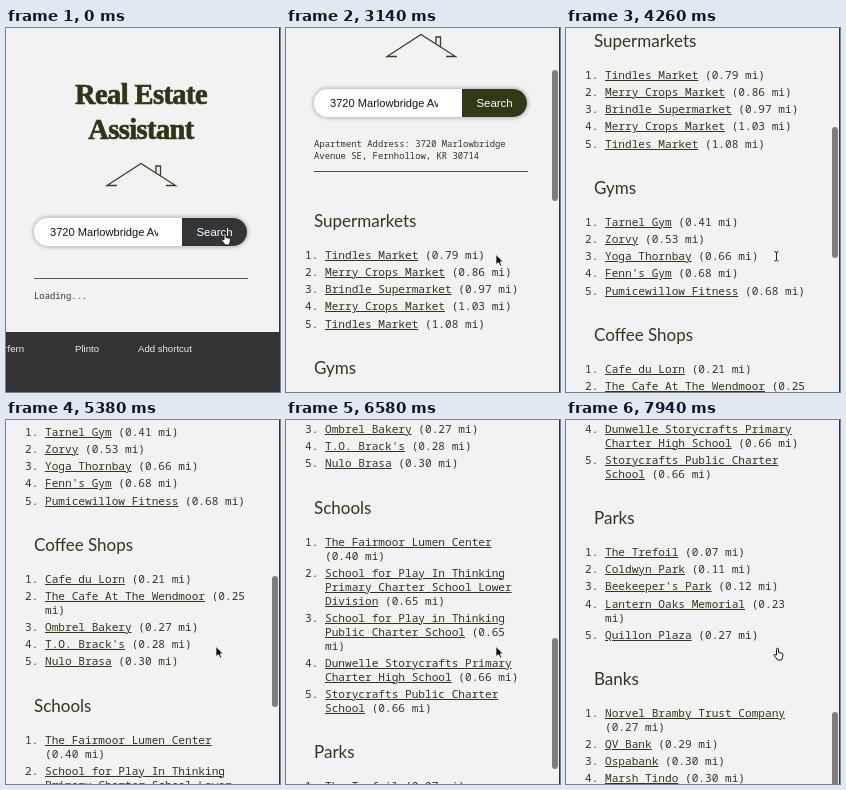
Recreate the animation shown at these times as an HTML page. Size 274 px wide and 364 px high, loop 8000 ms.

```html
<!DOCTYPE html>
<html lang="en">
<head>
<meta charset="utf-8">
<title>Real Estate Assistant</title>
<style>
html, body { margin: 0; width: 100%; height: 100%; overflow: hidden; background: #f2f2f2; }
#stage { position: relative; width: 274px; height: 364px; overflow: hidden; color: #2f381b; }
#stage div, #stage svg { position: absolute; white-space: nowrap; }
#page { left: 0; top: 0; width: 274px; }
#title { left: 0; top: 48.5px; width: 270px; text-align: center; color: #2c3616;
  font: bold 28.5px/35px "Liberation Serif", serif; letter-spacing: -.6px; -webkit-text-stroke: .7px #2c3616; }
#house { left: 0; top: 0; fill: none; stroke: #363f20; stroke-width: 1.3; }
#search { left: 28px; top: 190px; width: 213px; height: 28px; border-radius: 14px; overflow: hidden; background: #fff;
  font: 11.1px/28px "Liberation Sans", sans-serif; color: #111; }
#shade { left: 28px; top: 190px; width: 213px; height: 28px; border-radius: 14px; box-shadow: 0 0 4px 1px rgba(0,0,0,.28); }
#query { left: 16px; width: 108px; overflow: hidden; }
#button { left: 148px; width: 65px; height: 28px; text-align: center; color: #fff; font-size: 11.4px; }
.small { left: 28px; font: 8.89px/11.5px "Noto Sans Mono", monospace; }
.rule { left: 28px; width: 214px; height: 1px; background: #555; }
#list { left: 0; top: 284.45px; width: 274px; }
h2 { margin: 27.55px 0 16.75px 28px; font: 17px/20px Lato, sans-serif; }
ol { margin: 0; padding: 0 0 0 39px; width: 203px; list-style: none; counter-reset: n; white-space: normal;
  font: 11.11px/13.9px "Noto Sans Mono", monospace; }
li { position: relative; margin-bottom: 3.3px; counter-increment: n; }
li::before { content: counter(n) "."; position: absolute; left: -20px; }
#thumb { left: 266px; width: 6px; height: 131px; border-radius: 3px; background: #7d7d7d; }
#edge { left: 273px; top: 0; width: 1px; height: 364px; background: #333; }
#bar { left: 0; top: 304px; width: 274px; height: 60px; background: #333; color: #eee;
  font: 9.6px/34px "Liberation Sans", sans-serif; }
#stage svg.cursor { left: 0; top: 0; overflow: visible; stroke-linejoin: round; }
</style>
</head>
<body>
<div id="stage">
  <div id="page">
    <div id="title">Real Estate<br>Assistant</div>
    <svg id="house" width="274" height="170"><path d="M111 157.5H101L135 135.5L169.5 157.5H160M150 144.5V138H154.5V147.5"/></svg>
    <div id="shade"></div>
    <div id="search"><div id="query">3720 Marlowbridge Avenue SE</div><div id="button">Search</div></div>
    <div id="loading">
      <div class="rule" style="top:250px"></div>
      <div class="small" style="top:261.5px">Loading...</div>
    </div>
    <div id="results">
      <div class="small" style="top:239.3px">Apartment Address: 3720 Marlowbridge<br>Avenue SE, Fernhollow, KR 30714</div>
      <div class="rule" id="line" style="top:272px"></div>
      <div id="list"></div>
    </div>
  </div>
  <div id="thumb"></div>
  <div id="bar">
    <div style="right:256px">rfern</div>
    <div style="left:69px">Plinto</div>
    <div style="left:132px">Add shortcut</div>
  </div>
  <div id="edge"></div>
  <svg class="cursor" id="hand" width="12" height="14"><path fill="#fff" stroke="#111" d="M3 7V1.2a1 1 0 0 1 2 0V4.5l3.6.8q1 .3.9 1.5L9 9.5l-.9 2.5H4.2L.6 7.6q-.3-1.2.9-1Z"/></svg>
  <svg class="cursor" id="arrow" width="12" height="14"><path stroke="#fff" stroke-width=".8" d="M0 0V10.2L2.4 8l1.7 3.6 1.6-.8L4.1 7.4H7.2Z"/></svg>
  <svg class="cursor" id="beam" width="6" height="12"><path fill="none" stroke="#222" d="M.5.5Q2.5.5 2.5 2V8.5Q2.5 10 .5 10M4.5.5Q2.5.5 2.5 2M2.5 8.5Q2.5 10 4.5 10"/></svg>
</div>
<script>
const places = `Supermarkets|Tindles Market,0.79|Merry Crops Market,0.86|Brindle Supermarket,0.97|Merry Crops Market,1.03|Tindles Market,1.08
Gyms|Tarnel Gym,0.41|Zorvy,0.53|Yoga Thornbay,0.66|Fenn's Gym,0.68|Pumicewillow Fitness,0.68
Coffee Shops|Cafe du Lorn,0.21|The Cafe At The Wendmoor,0.25|Ombrel Bakery,0.27|T.O. Brack's,0.28|Nulo Brasa,0.30
Schools|The Fairmoor Lumen Center,0.40|School for Play In Thinking Primary Charter School Lower Division,0.65|School for Play in Thinking Public Charter School,0.65|Dunwelle Storycrafts Primary Charter High School,0.66|Storycrafts Public Charter School,0.66
Parks|The Trefoil,0.07|Coldwyn Park,0.11|Beekeeper's Park,0.12|Lantern Oaks Memorial,0.23|Quillon Plaza,0.27
Banks|Norvel Bramby Trust Company,0.27|QV Bank,0.29|Ospabank,0.30|Marsh Tindo,0.30`;

const $ = id => document.getElementById(id);
const show = (id, on) => $(id).style.visibility = on ? 'visible' : 'hidden';

$('list').innerHTML = places.split('\n').map(section => {
  const [head, ...items] = section.split('|');
  const rows = items.map(item => {
    const [name, miles] = item.split(',');
    return `<li><u>${name}</u> (${miles} mi)</li>`;
  });
  return `<h2>${head}</h2><ol>${rows.join('')}</ol>`;
}).join('');

// Each swipe: start time, distance
const swipes = [[2340, 132], [3380, 179], [4580, 184], [5780, 199], [7060, 231]];
const glide = u => 1 - (1 - Math.min(1, Math.max(0, u))) ** 3;
const scrollAt = t => Math.round(swipes.reduce((y, [start, d]) => y + d * glide((t - start) / 1120), 0));

function cursorAt(t) {
  if (t < 2020) return ['hand', 215, 205];
  if (t < 2100) return ['hand', 213.5, 210];
  if (t < 2180) return ['arrow', 212, 221];
  if (t >= 7620) return ['hand', 207.5, 228];
  if (t >= 3860 && t < 4660) return ['beam', 208, 223];
  return ['arrow', 210, 226.5];
}

function draw(now) {
  const t = 20 + Math.floor((now % 8000 - 20) / 80) * 80;
  const y = scrollAt(t), loading = t < 500;
  $('page').style.transform = `translateY(${-y}px)`;
  show('loading', loading);
  show('bar', loading);
  show('results', !loading);
  show('thumb', y > 0);
  $('thumb').style.top = 1.4 + y * .315 + 'px';
  $('line').style.background = y ? '#4a5038' : '#b3b5a9';
  $('button').style.background = t < 2100 ? '#333638' : '#2f3a17';
  const [kind, cx, cy] = cursorAt(t);
  for (const id of ['hand', 'arrow', 'beam']) show(id, id === kind);
  $(kind).style.transform = `translate(${cx}px, ${cy}px)`;
}

function loop() {
  draw(performance.now());
  requestAnimationFrame(loop);
}
loop();
</script>
</body>
</html>
```
